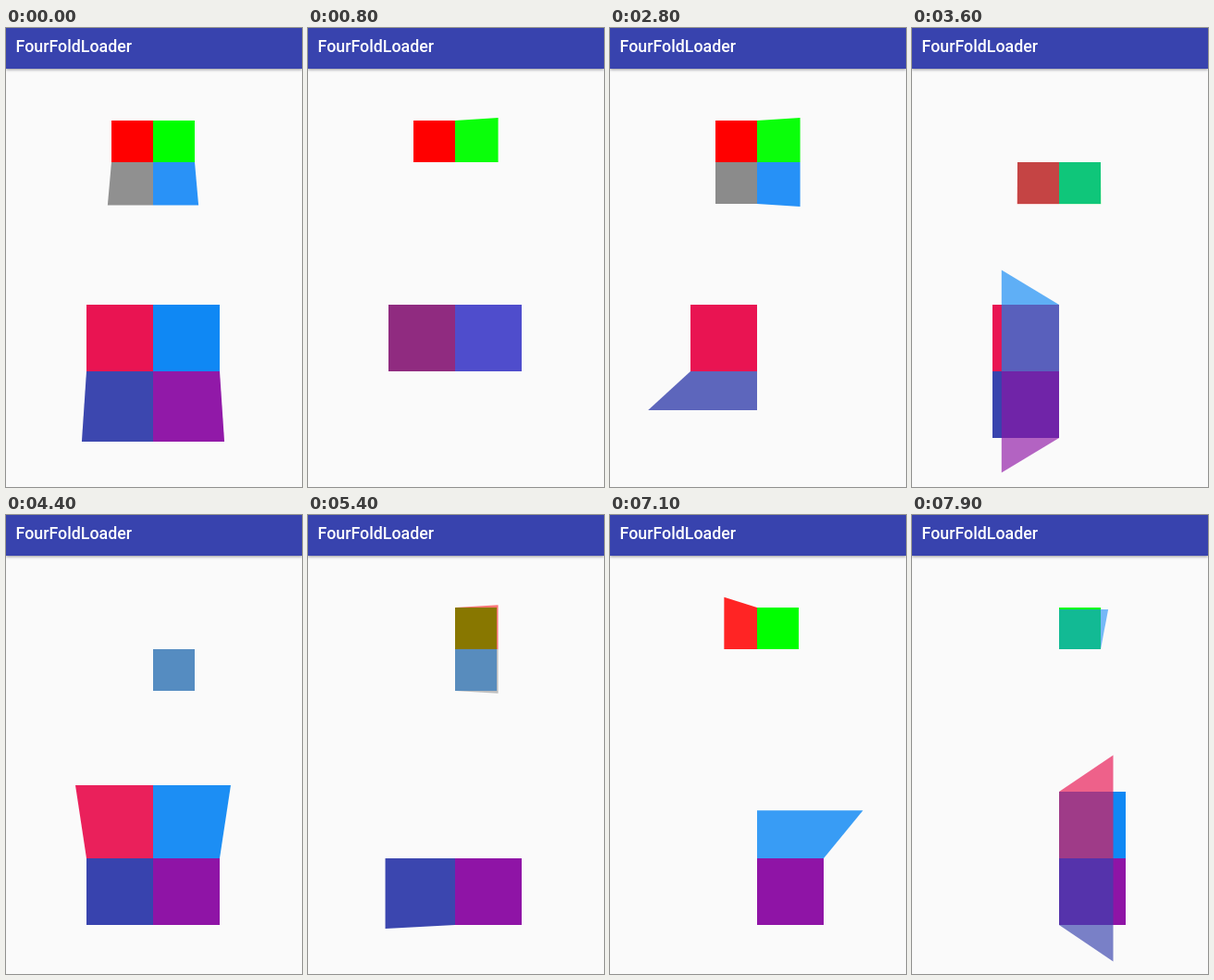
An HTML page with a canvas for the animation above (8000 ms loop, 320 by 496 pixels).

```html
<!DOCTYPE html>
<html lang="en">
<head>
<meta charset="utf-8">
<title>FourFoldLoader</title>
<style>
  html, body { margin: 0; width: 100%; height: 100%; overflow: hidden; background: #fafafa; }
  canvas { position: absolute; left: 0; top: 0; }
  header {
    position: absolute; left: 0; top: 0; width: 320px; height: 44px;
    background: #3843ae; box-shadow: 0 1px 3px rgba(0, 0, 0, .4);
  }
  h1 {
    position: absolute; left: 10.6px; top: 9px; margin: 0;
    font: 500 17.8px/22px Roboto, sans-serif; color: #fff; white-space: nowrap;
  }
</style>
</head>
<body>
<canvas id="stage" width="320" height="496"></canvas>
<header><h1>FourFoldLoader</h1></header>
<script>
const LOOP = 8000;
const CAMERA = 173;   // distance from the eye to the picture plane
const HOLD = 100;     // a folded flap rests this long before it vanishes
const ctx = document.getElementById('stage').getContext('2d');

// colors: top left, top right, bottom left, bottom right.
// mains: the [row, col] that stays in each round of four steps.
// starts: when each step begins to turn.
const loaders = [
  {
    x: 159, y: 145, side: 45, duration: 620,
    colors: ['#ff0000', '#00ff00', '#8b8b8b', '#1e8df7'],
    mains: [[0, 0], [1, 1], [0, 1]],
    starts: [-129, 688, 1540, 2292, 3020, 3780, 4560, 5296, 6084, 6880, 7718]
  },
  {
    x: 159, y: 371, side: 72, duration: 900,
    colors: ['#e91452', '#0f88f4', '#3843ae', '#8f14a6'],
    mains: [[0, 0], [1, 1]],
    starts: [-129, 980, 2284, 3264, 4206, 5284, 6564, 7554]
  }
];

const ease = t => (1 - Math.cos(Math.PI * Math.min(1, Math.max(0, t)))) / 2;

// Standing cells, turning cells and the hinge for the four steps of a round.
function cellsOf(step, [r, c]) {
  const row = 1 - r, col = 1 - c;
  return [
    { still: [[r, 0], [r, 1]], flap: [[row, 0], [row, 1]], hinge: 'x' },
    { still: [[r, c]], flap: [[r, col]], hinge: 'y' },
    { still: [[r, c]], flap: [[row, c]], hinge: 'x' },
    { still: [[0, c], [1, c]], flap: [[0, col], [1, col]], hinge: 'y' }
  ][step];
}

function drawCell(loader, [row, col], hinge, angle, alpha) {
  const { x, y, side, colors } = loader;
  const u = (col * 2 - 1) * side, v = (row * 2 - 1) * side;
  const cos = Math.cos(angle), sin = Math.sin(angle);
  ctx.globalAlpha = alpha;
  ctx.fillStyle = colors[row * 2 + col];
  ctx.beginPath();
  for (const [a, b] of [[0, 0], [u, 0], [u, v], [0, v]]) {
    const depth = Math.abs(hinge === 'x' ? b : a) * sin;
    const scale = CAMERA / (CAMERA - depth);
    ctx.lineTo(x + a * scale * (hinge === 'y' ? cos : 1),
               y + b * scale * (hinge === 'x' ? cos : 1));
  }
  ctx.fill();
}

function drawLoader(loader, time) {
  const { starts, duration, mains } = loader;
  let i = 0;
  while (i < starts.length - 1 &&
         time >= starts[i] + duration + (i % 4 < 2 ? HOLD : 0)) i++;
  const step = i % 4;
  const { still, flap, hinge } = cellsOf(step, mains[Math.floor(i / 4)]);
  const p = ease((time - starts[i]) / duration);
  const fold = step < 2 ? p : 1 - p;
  for (const cell of still) drawCell(loader, cell, hinge, 0, 1);
  for (const cell of flap) drawCell(loader, cell, hinge, fold * Math.PI, 1 - fold / 2);
}

const begin = performance.now();
function frame() {
  const time = (performance.now() - begin) % LOOP;
  ctx.clearRect(0, 0, 320, 496);
  for (const loader of loaders) drawLoader(loader, time);
  requestAnimationFrame(frame);
}
frame();
</script>
</body>
</html>
```
